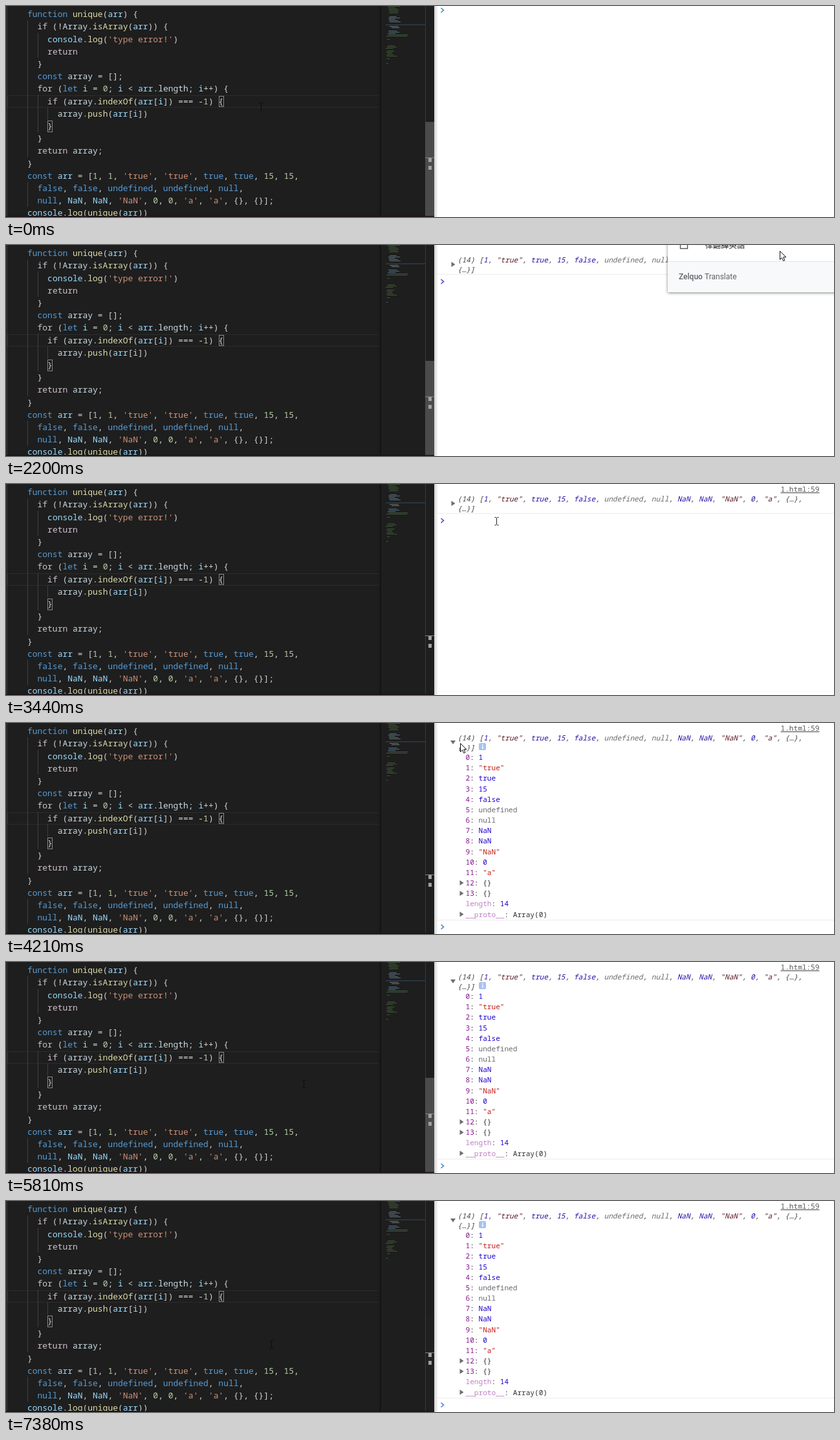
Recreate the animation shown at these times as an HTML page. Size 1280 px wide and 326 px high, loop 8000 ms.

```html
<!DOCTYPE html>
<html lang="en">
<head>
<meta charset="utf-8">
<title>Array dedupe demo</title>
<style>
  html, body { margin: 0; width: 100%; height: 100%; overflow: hidden; background: #fff; }
  svg { display: block; width: 1280px; height: 326px; }
  text { white-space: pre; font-family: "Noto Sans Mono", "DejaVu Sans Mono", monospace; }
  .code { font-size: 12.96px; fill: #d4d4d4; }
  .code .string { fill: #ce9178; }
  .code .keyword { fill: #569cd6; }
  .code .control { fill: #d0c2ce; }
  .code .call { fill: #dcdcaa; }
  .code .name { fill: #9cdcfe; }
  .code .pale { fill: #c8dae4; }
  .code .number { fill: #b5cea8; }
  .log { font-size: 11.1px; fill: #303030; }
  .log .string { fill: #c41a16; }
  .log .number { fill: #1c00cf; }
  .log .empty { fill: #6a6a6a; }
  .log .key { fill: #881391; }
  .log .dim { fill: #bf80c4; }
  .preview { font-style: italic; fill: #444; }
  .preview .string { fill: #5c1a24; }
  .preview .number { fill: #2412a8; }
  .popup { font: 500 12px Roboto, sans-serif; fill: #5f6368; }
  .cjk { font: 12.4px "Noto Sans CJK TC", "Noto Sans CJK", sans-serif; fill: #222; }
</style>
</head>
<body>
<svg id="stage" viewBox="0 0 1280 326"></svg>
<script>
const LOOP = 8000;
const LINE = 19.2, CHAR = 7.78;

const source = `function unique(arr) {
  if (!Array.isArray(arr)) {
    console.log('type error!')
    return
  }
  const array = [];
  for (let i = 0; i < arr.length; i++) {
    if (array.indexOf(arr[i]) === -1) {
      array.push(arr[i])
    }
  }
  return array;
}
const arr = [1, 1, 'true', 'true', true, true, 15, 15,
  false, false, undefined, undefined, null,
  null, NaN, NaN, 'NaN', 0, 0, 'a', 'a', {}, {}];
console.log(unique(arr))`.split('\n');

const codeTokens = /(?<string>'[^']*')|\b(?:(?<keyword>function|const|let|true|false|undefined|null)|(?<control>if|for|return)|(?<call>unique|isArray|log|push|indexOf)|(?<name>arr|i|NaN|console)|(?<pale>array|Array|length)|(?<number>\d+))\b/g;
const logTokens = /(?<string>"[^"]*")|\b(?:(?<number>true|false|NaN|\d+)|(?<empty>undefined|null))\b/g;

const span = (cls, s) => `<tspan class="${cls}">${s}</tspan>`;
const paint = (s, tokens) => s.replace(/</g, '&lt;').replace(tokens, (...m) => {
  const groups = m.at(-1);
  return span(Object.keys(groups).find(k => groups[k]), m[0]);
});
const text = (x, y, cls, s) => `<text x="${x}" y="${y}" class="${cls}">${s}</text>`;
const rect = (x, y, w, h, fill, more = '') =>
  `<rect x="${x}" y="${y}" width="${w}" height="${h}" fill="${fill}" ${more}/>`;
const path = (d, fill, more = '') => `<path d="${d}" fill="${fill}" ${more}/>`;

// Indent guide at a column, covering a range of one-based lines
const guide = (col, from, to) =>
  rect(33 + Math.round(col * CHAR), 3 + (from - 1) * LINE, 1, (to - from + 1) * LINE, '#404040');

function minimap() {
  let seed = 7, out = '';
  const random = () => (seed = seed * 16807 % 2147483647) / 2147483647;
  const bands = [ // first y, last y, x, widest, colour
    [0, 12, 590, 20, '#45663a'], [16, 26, 590, 22, '#6f8794'],
    [31, 35, 593, 18, '#8a8f86'], [38, 43, 589, 20, '#567f9c'],
    [44, 48, 588, 50, '#4a6a48'], [51, 52, 588, 8, '#45663a'],
    [61, 67, 587, 18, '#45663a'], [69, 79, 587, 18, '#45663a'],
    [81, 82, 587, 11, '#45663a'], [88, 89, 587, 5, '#4a7fa8']];
  for (const [top, bottom, x, widest, color] of bands)
    for (let y = top; y < bottom; y += 2) {
      const indent = Math.floor(random() * 4);
      out += rect(x + indent, y, widest * (.5 + random() * .5) - indent, 1, color,
        'stroke-dasharray="4 1" opacity=".75"');
    }
  return rect(587, 28.5, 61, 1, '#2f4c63') + out;
}

function editor() {
  const lines = source.map((line, i) => {
    const indent = line.search(/\S/);
    return text(33 + indent * CHAR, 17.2 + i * LINE, 'code', paint(line.trim(), codeTokens));
  }).join('');
  const bracket = 'stroke="#888" stroke-width="1"';
  return rect(0, 0, 662, 326, '#1e1e1e') + rect(1, 0, 1, 326, '#3a3a3a')
    + rect(2.5, 138.5, 576, 18, 'none', 'stroke="#2c2c2c"')
    + guide(0, 2, 12) + guide(2, 3, 4) + guide(2, 8, 10) + guide(4, 9, 9) + guide(0, 15, 16)
    + rect(329.5, 139.5, 7, 16, 'none', bracket) + rect(64.5, 177.5, 7, 17, 'none', bracket)
    + lines + rect(576, 0, 4, 326, 'url(#mapShade)') + minimap()
    + rect(648, 0, 1, 326, '#383838')
    + `<g id="slider">${rect(648, 179, 14, 147, '#4b4b4b')}</g>`
    + rect(648, 234, 14, 1, '#8c8286')
    + rect(653, 235, 5, 6, '#a0a0a0') + rect(653, 247, 5, 6, '#a0a0a0')
    + rect(0, 324.5, 662, 1.5, '#1b1118')
    + `<g id="caret">${rect(337, 138, 2, 19, '#c4c4c4')}</g>`;
}

function details() {
  const values = ['1', '"true"', 'true', '15', 'false', 'undefined', 'null', 'NaN', 'NaN',
    '"NaN"', '0', '"a"', '{}', '{}'];
  const rows = values.map((v, i) => [i, 'key', v]);
  rows.push(['length', 'dim', '14'], ['__proto__', 'dim', 'Array(<tspan>0</tspan>)']);
  return rows.map(([key, cls, value], i) => {
    const y = 57 + i * 16.17;
    const shown = cls === 'dim' && i === 15 ? value : paint(value, logTokens);
    const arrow = [12, 13, 15].includes(i)
      ? path(`M701.5 ${y - 8}l6 4-6 4z`, '#6e6e6e') : '';
    return arrow + text(710.5, y, 'log', `${span(cls, key)}: ${shown}`);
  }).join('') + rect(731, 31, 11, 11, '#a9c3ee', 'rx="2"')
    + rect(736, 33, 1.5, 1.5, '#fff') + rect(736, 35.5, 1.5, 4.5, '#fff');
}

function panel() {
  const preview = '[1, "true", true, 15, false, undefined, null, NaN, NaN, "NaN", 0, "a", {…},';
  return rect(662, 0, 618, 326, '#fff') + rect(662, 0, 6, 326, 'url(#edge)')
    + '<g id="output">'
    + text(698, 27, 'log preview', '(14) ' + paint(preview, logTokens))
    + text(698, 42, 'log preview', '{…}]')
    + text(1197.5, 12, 'log', '<tspan fill="#545454" text-decoration="underline">1.html:59</tspan>')
    + '<g id="closed">' + path('M688.5 26l6 4-6 4z', '#6e6e6e') + '</g>'
    + '<g id="open">' + path('M687 27h8l-4 6z', '#6e6e6e') + details() + '</g>'
    + '<g id="rule">' + rect(667, 0, 613, 1, '#ececec') + '</g></g>'
    + '<g id="prompt">' + path('M-2 -3.5L2 0L-2 3.5', 'none', 'stroke-width="1.6"') + '</g>';
}

const popup = () => '<g id="popup">'
  + rect(1023, -20, 400, 93, '#fff', 'filter="url(#drop)"')
  + rect(1023, 25, 400, 48, '#f8f9fa') + rect(1023, 25, 400, 1, '#e4e5e7')
  + rect(1042.5, -6.5, 11, 12, 'none', 'stroke="#555" stroke-width="1.4"')
  + text(1068, 5, 'cjk', '一律翻譯英語')
  + text(1040, 53, 'popup', 'Zelquo <tspan font-weight="400">Translate</tspan>') + '</g>';

const beam = 'M-3 -6h2l1 1 1-1h2M0 -5V5M-3 6h2l1-1 1 1h2';
const pointers = () =>
  path(beam, 'none', 'id="beam"')
  + path('M0 0V13L3 10.2L5.2 15L7.4 14L5.2 9.3H9.4Z', '#fff', 'id="arrow" stroke="#111"');

const stage = document.getElementById('stage');
stage.innerHTML = `<defs>
  <linearGradient id="mapShade"><stop stop-color="#1e1e1e"/><stop offset="1" stop-color="#121212"/></linearGradient>
  <linearGradient id="edge"><stop stop-color="#cfcfcf"/><stop offset="1" stop-color="#fff"/></linearGradient>
  <filter id="drop" x="-5%" y="-10%" width="110%" height="130%">
    <feDropShadow dx="0" dy="1" stdDeviation="2" flood-opacity=".5"/></filter>
</defs>` + panel() + editor() + popup() + pointers();

const el = id => document.getElementById(id);
const show = (id, on) => el(id).setAttribute('opacity', Number(on));
const between = (t, a, b) => t >= a && t < b;
const clamp = v => Math.max(0, Math.min(1, v));

const track = [ // time, x, y of the mouse
  [0, 394, 155], [1420, 394, 155], [1600, 420, 147], [1720, 511, 128], [1940, 850, 60],
  [2120, 1150, 14], [2200, 1196, 9], [2270, 1196, 9], [2400, 1249, 2], [2510, 1249, -20],
  [3190, 1040, -20], [3200, 1023, 14], [3440, 758, 57], [3600, 725, 50], [3890, 702, 31],
  [4670, 702, 31], [4980, 697, 64], [5060, 697, 64], [5120, 675, 72], [5290, 675, 72],
  [5500, 580, 110], [5810, 460, 188], [5980, 460, 188], [6250, 216, 283], [6420, 400, 150],
  [6600, 600, 60], [6750, 715, 24], [6850, 760, 30], [7050, 1195, 120], [7220, 760, 190],
  [7320, 500, 215], [7380, 410, 221], [LOOP, 410, 221]];

function mouseAt(t) {
  const i = Math.max(1, track.findIndex(k => k[0] > t));
  const [a, b] = [track[i - 1], track[i]];
  const p = (t - a[0]) / (b[0] - a[0]);
  return [a[1] + (b[1] - a[1]) * p, a[2] + (b[2] - a[2]) * p];
}

function draw(t) {
  const logged = t >= 1420, opened = t >= 4210, popped = between(t, 1420, 2970);
  show('caret', between(t, 500, 960) || between(t, 1420, 1900) || between(t, 2420, 2890));
  show('output', logged);
  show('open', opened);
  show('closed', !opened);
  el('rule').setAttribute('transform', `translate(0 ${opened ? 304 : 45})`);
  el('prompt').setAttribute('transform', `translate(674.5 ${opened ? 315 : logged ? 56.5 : 6.5})`);
  el('prompt').setAttribute('stroke', opened ? '#4585d2' : logged ? '#4a4ad0' : '#3c8dbc');

  const slider = t < 2970 ? 1
    : t < 6850 ? clamp((t - 5450) / 150)
    : t < 7300 ? clamp((7150 - t) / 300) : .06;
  show('slider', slider);

  const grow = clamp((t - 1390) / 200);
  const scale = .965 + .035 * grow;
  show('popup', popped ? grow : 0);
  el('popup').setAttribute('transform', `translate(${1223 * (1 - scale)} 0) scale(${scale})`);

  const [x, y] = mouseAt(t);
  const inEditor = x < 579;
  const overPopup = popped && x > 1023 && y < 73;
  const isBeam = inEditor || (x > 715 && !overPopup);
  for (const id of ['beam', 'arrow']) {
    show(id, (id === 'beam') === isBeam);
    el(id).setAttribute('transform', `translate(${Math.round(x) + .5} ${Math.round(y) + .5})`);
  }
  el('beam').setAttribute('stroke', inEditor ? '#0c0c0c' : '#222');
}

function frame() {
  draw(performance.now() % LOOP);
  requestAnimationFrame(frame);
}
frame();
</script>
</body>
</html>
```
